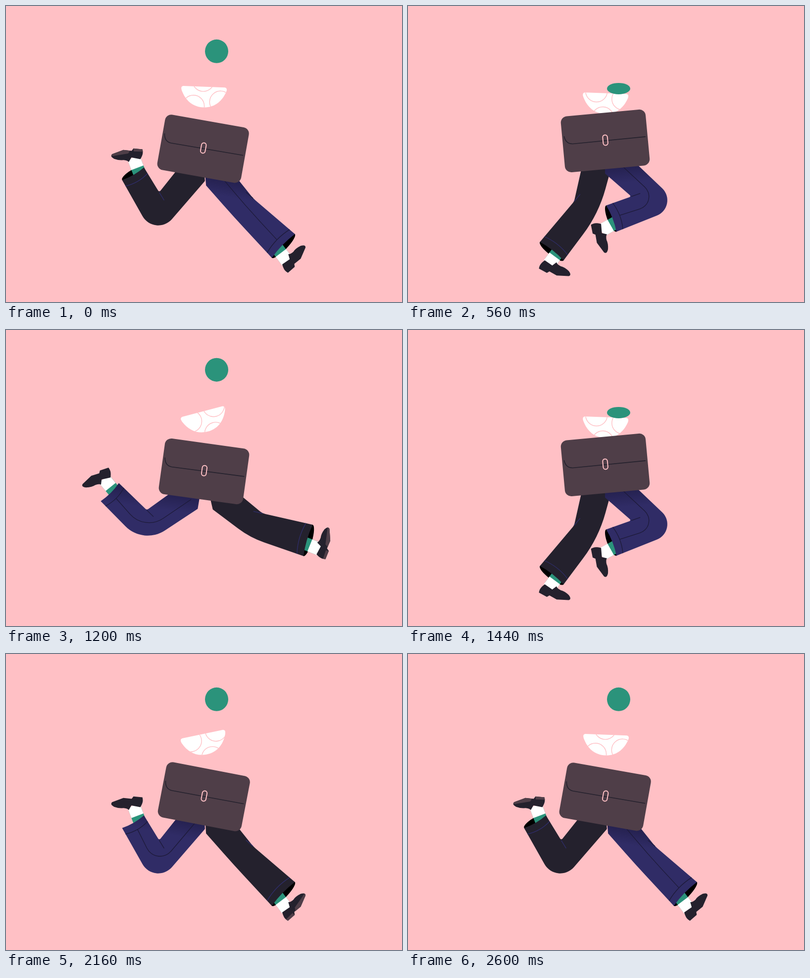
An HTML page with a canvas that plays this animation: 800 by 600 pixels, repeating every 2.64 s.

```html
<!DOCTYPE html>
<html lang="en">
<head>
<meta charset="utf-8">
<title>Running briefcase</title>
<style>
  html, body { margin: 0; width: 100%; height: 100%; overflow: hidden; background: #ffc0c5; }
  canvas { display: block; }
</style>
</head>
<body>
<canvas id="stage" width="800" height="600"></canvas>
<script>
const ctx = document.getElementById('stage').getContext('2d');
const PINK = '#ffc0c5', NAVY = '#302c66', INK = '#24212d', GREEN = '#2b937b', BROWN = '#4f3e48';
const TAU = Math.PI * 2, RAD = Math.PI / 180;

// A run cycle has 14 poses; the second step repeats the first with the legs swapped.
const STEP = 440, POSES = 14;
const starts = [0, 80, 120, 160, 200, 280, 360];

const shirt = new Path2D('M-42 -1H42Q48 0 45 8C36 30 20 41 0 41C-20 41 -36 30 -45 8Q-48 0 -42 -1Z');
const shoe = new Path2D('M-12 -1C-20 8 -20 12 -20 18L-2.5 23L2 19L18 24L42 20Q48 17 40 10Q30 4 22 4Q14 2 12 -2L5 6Z');
const sole = new Path2D('M-20 13V18L-2.5 23L-2 17ZM5 20L18 24L42 20L44 16L10 15Z');
const flap = new Path2D('M-82 -17Q-80 -1 -66 0L82 -1');

const mix = (a, b, k) => ({ x: a.x + (b.x - a.x) * k, y: a.y + (b.y - a.y) * k });
const gap = (a, b) => Math.hypot(b.x - a.x, b.y - a.y);
const toward = (a, b, d) => mix(a, b, d / gap(a, b));

// Sum of a mean and the first harmonics of the run cycle.
function wave(p, mean, c1 = 0, s1 = 0, c2 = 0, s2 = 0, s3 = 0) {
  const a = p / POSES * TAU;
  return mean + c1 * Math.cos(a) + s1 * Math.sin(a) + c2 * Math.cos(2 * a)
    + s2 * Math.sin(2 * a) + s3 * Math.sin(3 * a);
}

// Moves along a limb (angle 0 hangs down, positive swings forward) and sideways to its front.
const shift = (o, angle, along, front) => ({
  x: o.x + Math.sin(angle) * along + Math.cos(angle) * front,
  y: o.y + Math.cos(angle) * along - Math.sin(angle) * front
});

function legAt(p) {
  const thigh = RAD * wave(p, 7.3, 40, -40.5, -7.3, 6);
  const shin = RAD * wave(p, -47.1, 98, -14.7, -4.9, -25, -10);
  const flex = RAD * wave(p, -6.5, -15, -6.8, 10.5);
  const hip = { x: wave(p, 403, 33, -34), y: wave(p, 343, 4.5, 5.6, 9) };
  const knee = shift(hip, thigh, wave(p, 84, -16.5, -11.5), 0);
  const cuff = shift(knee, shin, wave(p, 105, 7.5, 6.5), 0);
  cuff.y = Math.min(cuff.y, 497);
  const foot = shift(cuff, shin, 23, wave(p, 0, 0, 0, -16.5));
  foot.y = Math.min(foot.y, 519);
  const root = shift(cuff, shin, -5, wave(p, 0, 0, 0, -12));

  const half = (thigh - shin) / 2, miter = 27 / Math.max(.4, Math.cos(half));
  const side = s => ({
    top: shift(hip, thigh, -15, 29 * s),
    knee: shift(knee, (thigh + shin) / 2, 0, miter * s),
    cuff: shift(cuff, shin, 0, s * wave(p, 29.5, 4))
  });
  return { front: side(1), back: side(-1), knee, cuff, foot, root, turn: flex - shin, over: shin > thigh };
}

// Continues the path from a to c with a rounded corner at b.
function bend(a, b, c, size) {
  const t = Math.min(size, gap(a, b) * .9, gap(b, c) * .9);
  const ux = (a.x - b.x) / gap(a, b), uy = (a.y - b.y) / gap(a, b);
  const wx = (c.x - b.x) / gap(b, c), wy = (c.y - b.y) / gap(b, c);
  const half = Math.acos(Math.max(-1, Math.min(1, ux * wx + uy * wy))) / 2;
  ctx.arcTo(b.x, b.y, c.x, c.y, Math.min(3000, t * Math.tan(half)));
  ctx.lineTo(c.x, c.y);
}

// Curve from a to b, pulled toward a third point.
function hem(a, b, to, pull) {
  const m = toward(mix(a, b, .5), to, pull);
  ctx.quadraticCurveTo(m.x, m.y, b.x, b.y);
}

function line(a, b, color, width) {
  ctx.strokeStyle = color;
  ctx.lineWidth = width;
  ctx.beginPath();
  ctx.moveTo(a.x, a.y);
  ctx.lineTo(b.x, b.y);
  ctx.stroke();
}

function at(x, y, turn, draw) {
  ctx.save();
  ctx.translate(x, y);
  ctx.rotate(turn);
  draw();
  ctx.restore();
}

function drawFoot(leg, showSole) {
  const { foot, root, turn } = leg;
  line(root, foot, GREEN, 26);
  line(mix(root, foot, .4), toward(foot, root, -5), '#fff', 26);
  at(foot.x, foot.y, turn, () => {
    ctx.fillStyle = INK;
    ctx.fill(shoe);
    ctx.fillStyle = BROWN;
    if (showSole) ctx.fill(sole);
  });
}

// Cloth colour; the near leg is darker just below the bag.
function cloth(near, bag) {
  if (!near) return INK;
  const below = d => [bag.x - Math.sin(bag.turn) * d, bag.y + Math.cos(bag.turn) * d];
  const shade = ctx.createLinearGradient(...below(55), ...below(88));
  shade.addColorStop(0, '#252150');
  shade.addColorStop(1, NAVY);
  return shade;
}

function drawLeg(p, near, bag) {
  const leg = legAt(p), { front, back, knee, cuff, over } = leg;
  const raised = p > 4 && p < 9;

  if (!near || !raised) {
    at(cuff.x, cuff.y, Math.atan2(front.cuff.y - cuff.y, front.cuff.x - cuff.x), () => {
      ctx.fillStyle = '#000';
      ctx.beginPath();
      ctx.ellipse(0, 0, gap(cuff, front.cuff), 8, 0, 0, TAU);
      ctx.fill();
    });
  }
  drawFoot(leg, !near && (raised || p > 10 || p < 2));

  ctx.fillStyle = cloth(near, bag);
  ctx.beginPath();
  ctx.moveTo(front.top.x, front.top.y);
  bend(front.top, front.knee, front.cuff, over ? 6 : 52);
  hem(front.cuff, back.cuff, knee, 5);
  bend(back.cuff, back.knee, back.top, over ? 30 : 4);
  ctx.lineTo(bag.x, bag.y);
  ctx.fill();

  // Hem seam, crease and knee fold
  const seam = near ? '#1d1a38' : '#2f2d6a';
  const hemA = toward(front.cuff, front.knee, 14), hemB = toward(back.cuff, back.knee, 14);
  ctx.strokeStyle = seam;
  ctx.lineWidth = 1.3;
  ctx.beginPath();
  ctx.moveTo(hemA.x, hemA.y);
  hem(hemA, hemB, knee, 8);
  if (near) {
    const top = mix(back.top, front.top, .6);
    ctx.moveTo(top.x, top.y);
    bend(top, mix(back.knee, front.knee, .6), toward(mix(hemB, hemA, .5), knee, 4), 45);
  }
  ctx.stroke();
  const inner = over ? front : back;
  line(inner.knee, toward(inner.knee, inner.cuff, -19), seam, 1.3);
}

function drawBag(bag) {
  at(bag.x, bag.y, bag.turn, () => {
    ctx.fillStyle = BROWN;
    ctx.beginPath();
    ctx.roundRect(-86, -57, 172, 114, 13);
    ctx.fill();
    ctx.strokeStyle = INK;
    ctx.lineWidth = 1.6;
    ctx.stroke(flap);
    ctx.strokeStyle = PINK;
    ctx.lineWidth = 2;
    ctx.beginPath();
    ctx.roundRect(-4.5, -12, 9.5, 21, 4.7);
    ctx.stroke();
  });
}

// The print is a ring of three circles that turns by one place per cycle.
function drawShirt(p, y, tilt) {
  at(wave(p, 398.7, 1.5, -1), y, tilt, () => {
    ctx.fillStyle = '#fff';
    ctx.fill(shirt);
    ctx.clip(shirt);
    ctx.strokeStyle = PINK;
    ctx.lineWidth = 1.4;
    for (let k = 0; k < 3; k++) {
      const a = (k + p / POSES) * TAU / 3 + 19 * RAD;
      ctx.beginPath();
      ctx.arc(4 + 32 * Math.cos(a), 18 + 32 * Math.sin(a), 22, 0, TAU);
      ctx.stroke();
    }
  });
}

// Free fall between bounces; the ball flattens on the shirt.
function drawBall(i, tilt) {
  const away = Math.abs((i - 2.6 + 10.5) % 7 - 3.5);
  const fall = 80.5 + 14 * (3.5 - away) ** 2;
  const press = Math.max(0, fall - 154) * .205;
  const lean = press * 2 * Math.tan(tilt);
  ctx.fillStyle = GREEN;
  ctx.beginPath();
  ctx.ellipse(425.5, Math.min(fall, 178 - 24 + press) + lean, 23.5, 24 - press, 0, 0, TAU);
  ctx.fill();
}

function poseAt(ms) {
  const u = ms + 40, side = Math.floor(u / STEP) % 2;
  return side * 7 + starts.findLastIndex(s => s <= u % STEP);
}

function frame(ms) {
  const p = poseAt(Math.max(0, ms));
  const bag = {
    x: wave(p, 399, -.8, .7),
    y: wave(p, 281.3, 0, .7, 8),
    turn: RAD * wave(p, 2.3, -.4, .3, 8.2)
  };
  const tilt = RAD * wave(p, -4.8, 7, -8.7);

  ctx.fillStyle = PINK;
  ctx.fillRect(0, 0, 800, 600);
  drawLeg((p + 7) % POSES, false, bag);
  drawLeg(p, true, bag);
  drawShirt(p, wave(p, 171.3, .6, 0, -7.3), tilt);
  drawBag(bag);
  drawBall(p % 7, tilt);
  requestAnimationFrame(frame);
}
requestAnimationFrame(frame);
</script>
</body>
</html>
```
